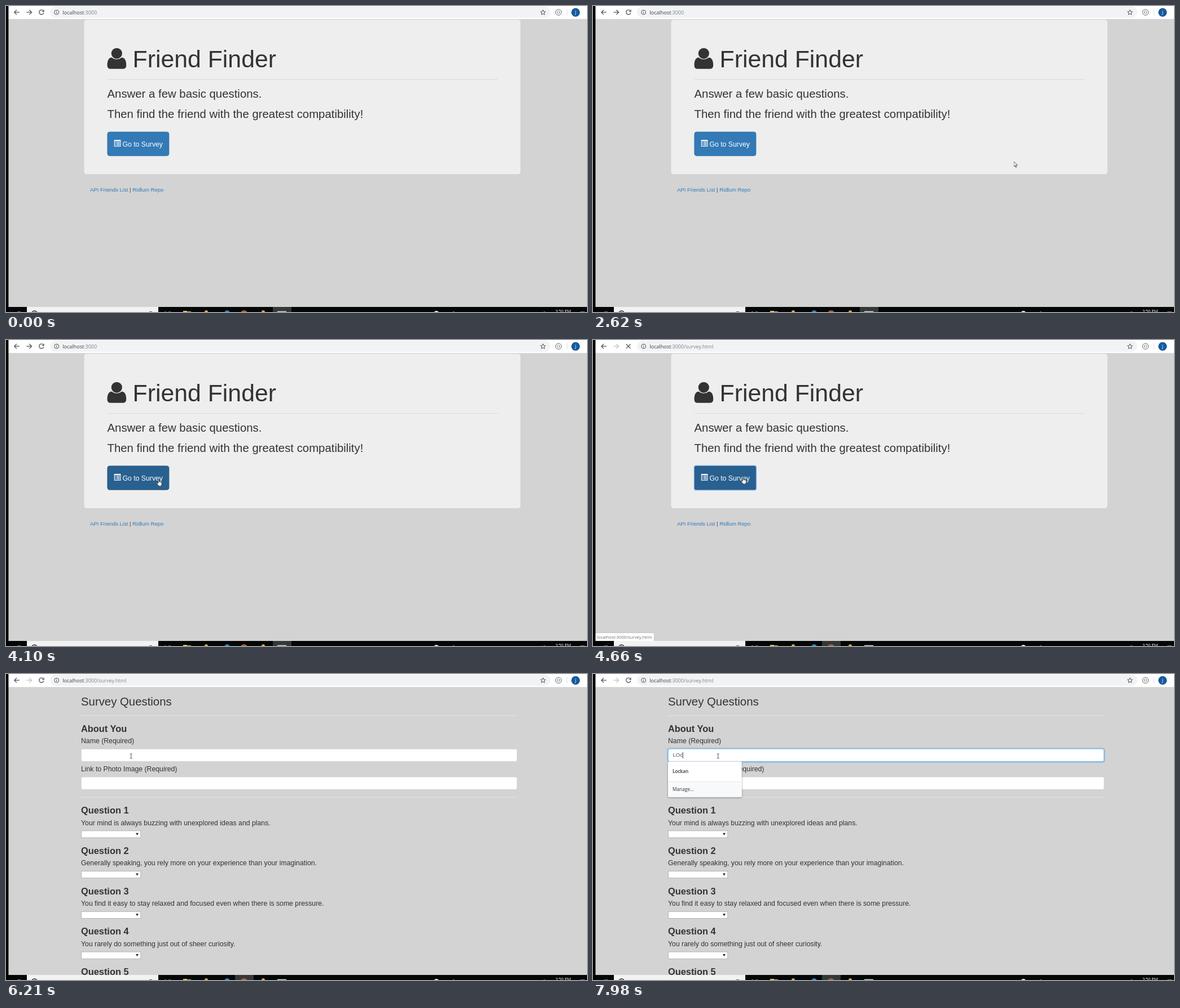
Animation, 1030 px wide and 544 px high, one loop 8 s. Source, as an HTML page:

```html
<!DOCTYPE html>
<html lang="en">
<head>
<meta charset="utf-8">
<title>Friend survey</title>
<style>
html, body { margin: 0; width: 100%; height: 100%; overflow: hidden; background: #000; }
svg { display: block; width: 1030px; height: 544px; }
text { font-family: "Liberation Sans", Arial, sans-serif; fill: #333; white-space: pre; }
.ui { font-family: "Open Sans", "Noto Sans", sans-serif; }
.h1 { font-size: 42.8px; }
.h3 { font-size: 20.38px; }
.h4 { font-size: 16.38px; font-weight: bold; }
.p { font-size: 12.28px; }
.small { font-size: 9.56px; }
.url { font-size: 9.04px; fill: #3c4043; }
.dim { fill: #80868b; }
.link { fill: #337ab7; }
.line { fill: none; stroke: #505357; stroke-width: 1.3; }
.rule { fill: #e6e6e6; }
.field { fill: #fff; stroke: #ccc; stroke-width: .7; }
.focus { stroke: #66afe9; stroke-width: 1.2; filter: drop-shadow(0 0 1.5px #66afe9); }
.list { filter: drop-shadow(0 1px 1.5px #0006); }
.name { font-size: 8.2px; font-weight: 600; }
.glyph { fill: #fff; stroke: #222; stroke-width: .8; stroke-linejoin: round; }

/* one loop = 8 s, 1% = 80 ms */
.t { animation: 8s step-end infinite; }
.home { animation-name: home; }
.survey { animation-name: survey; }
.url-a, .fwd { animation-name: before-load; }
.url-b, .fwd-off { animation-name: after-load; }
.reload { animation-name: reload; }
.stop { animation-name: stop; }
.btn { animation-name: btn; }
.ring { animation-name: ring; }
.status { animation-name: status; }
.active { animation-name: active; }
.input-on { animation-name: input-on; }
.all { animation-name: all; }
.two { animation-name: two; }
.one { animation-name: one; }
.k1 { animation-name: k1; }
.k2 { animation-name: k2; }
.k3 { animation-name: k3; }
.k4 { animation-name: k4; }
.caret { animation-name: caret; }
.arrow { animation-name: arrow; }
.hand { animation-name: hand; }
.beam { animation-name: beam; }
.pointer { animation-name: pointer; }

@keyframes home { 0% { opacity: 1 } 60.25%, 100% { opacity: 0 } }
@keyframes survey { 0% { opacity: 0 } 60.25%, 100% { opacity: 1 } }
@keyframes before-load { 0% { opacity: 1 } 57.25%, 100% { opacity: 0 } }
@keyframes after-load { 0% { opacity: 0 } 57.25%, 100% { opacity: 1 } }
@keyframes reload { 0% { opacity: 1 } 57.25% { opacity: 0 } 60.25%, 100% { opacity: 1 } }
@keyframes stop { 0% { opacity: 0 } 57.25% { opacity: 1 } 60.25%, 100% { opacity: 0 } }
@keyframes btn { 0% { fill: #337ab7; stroke: #2e6da4 } 50.25%, 100% { fill: #286090; stroke: #204d74 } }
@keyframes ring { 0% { opacity: 0 } 56.25%, 100% { opacity: 1 } }
@keyframes status {
  0% { opacity: 0 } 54.125% { opacity: .35 } 55.125% { opacity: .7 } 56.25% { opacity: 1 }
  62% { opacity: .65 } 63% { opacity: .3 } 63.875%, 100% { opacity: 0 }
}
@keyframes active { 0% { transform: translateX(67px) } 56.25%, 100% { transform: none } }
@keyframes input-on { 0% { opacity: 0 } 83.375%, 100% { opacity: 1 } }
@keyframes all {
  0% { opacity: 0 } 78.375% { opacity: .25 } 79.375% { opacity: .5 } 80.5% { opacity: .8 }
  81.625% { opacity: 1 } 90.125%, 100% { opacity: 0 }
}
@keyframes two { 0% { opacity: 0 } 90.125% { opacity: 1 } 91%, 100% { opacity: 0 } }
@keyframes one { 0% { opacity: 0 } 91% { opacity: 1 } 92.75% { opacity: 0 } 93.875%, 100% { opacity: 1 } }
@keyframes k1 { 0% { opacity: 0 } 89.125%, 100% { opacity: 1 } }
@keyframes k2 { 0% { opacity: 0 } 91%, 100% { opacity: 1 } }
@keyframes k3 { 0% { opacity: 0 } 92.75%, 100% { opacity: 1 } }
@keyframes k4 { 0% { opacity: 0 } 93.875% { opacity: 1 } 99.75%, 100% { opacity: 0 } }
@keyframes caret {
  0% { opacity: 0; transform: none } 78.375% { opacity: 1; transform: none }
  86.25% { opacity: 0; transform: none } 89.125% { opacity: 1; transform: translateX(5.3px) }
  91% { opacity: 1; transform: translateX(12.7px) } 92.75% { opacity: 1; transform: translateX(17.5px) }
  93.875% { opacity: 1; transform: translateX(22.3px) } 99.75%, 100% { opacity: 1; transform: translateX(17.5px) }
}
@keyframes arrow {
  0% { opacity: 0 } 4% { opacity: 1 } 13.375% { opacity: 0 } 21.25% { opacity: 1 }
  50.25% { opacity: 0 } 67.75% { opacity: 1 } 76.6%, 100% { opacity: 0 }
}
@keyframes hand { 0% { opacity: 0 } 50.25% { opacity: 1 } 67.75%, 100% { opacity: 0 } }
@keyframes beam { 0% { opacity: 0 } 76.6%, 100% { opacity: 1 } }
@keyframes pointer {
  0% { transform: translate(894px, 536px) }
  4% { transform: translate(894px, 536px); animation-timing-function: steps(3) }
  6.625% { transform: translate(838px, 488px); animation-timing-function: steps(3) }
  9.375% { transform: translate(807px, 467px) }
  21.25% { transform: translate(923px, 519px); animation-timing-function: steps(4) }
  25.125% { transform: translate(836px, 405px); animation-timing-function: steps(2) }
  27.125% { transform: translate(814px, 431px) }
  31% { transform: translate(798px, 372px); animation-timing-function: steps(2) }
  32.75% { transform: translate(745.5px, 276px); animation-timing-function: steps(5) }
  37.625% { transform: translate(663px, 316px) }
  40.625% { transform: translate(640px, 328px); animation-timing-function: steps(3) }
  43.625% { transform: translate(505px, 308px); animation-timing-function: steps(3) }
  46.5% { transform: translate(405px, 276px) }
  49.375% { transform: translate(342px, 262px) }
  50.25% { transform: translate(285px, 252px) }
  51.25% { transform: translate(267px, 247.5px) }
  52.25% { transform: translate(265px, 246px) }
  54.125% { transform: translate(262.3px, 243.8px) }
  67.75% { transform: translate(260px, 236px); animation-timing-function: steps(5) }
  72.7% { transform: translate(236px, 170px); animation-timing-function: steps(5) }
  77.625%, 100% { transform: translate(219.5px, 141.5px) }
}
</style>
</head>
<body>
<svg viewBox="0 0 1030 544">
  <rect width="1030" height="544" fill="#d3d3d3"/>

  <g class="t home">
    <rect x="138.5" y="24.5" width="773.5" height="274.5" rx="4.5" fill="#eee"/>
    <g fill="#333">
      <ellipse cx="196.3" cy="84.3" rx="9.6" ry="9.6"/>
      <path d="M187 91.5Q179.5 92.5 179.5 105.5Q179.5 111.8 185.5 111.8H207Q213.2 111.8 213.2 105.5Q213.2 92.5 205.5 91.5Q196.3 98.5 187 91.5Z"/>
    </g>
    <text class="h1" x="224.5" y="108.6">Friend Finder</text>
    <rect x="179.5" y="130" width="692.5" height="1" fill="#dcdcdc"/>
    <text class="h3" x="179.5" y="163">Answer a few basic questions.</text>
    <text class="h3" x="179.5" y="198.7">Then find the friend with the greatest compatibility!</text>
    <rect class="t btn" x="179.9" y="223.9" width="109" height="42.4" rx="3.8" stroke-width=".8"/>
    <rect class="t ring" x="179.4" y="223.4" width="110" height="43.4" rx="3" fill="none" stroke="#72a9e6" stroke-width="1.3"/>
    <path d="M191.8 238H203.4V250H191.8ZM192.9 240.3V248.9H202.3V240.3Z" fill="#fff" fill-rule="evenodd"/>
    <path d="M193.8 241.8h1.2m1 0h5.5M193.8 243.7h1.2m1 0h5.5M193.8 245.6h1.2m1 0h5.5M193.8 247.5h1.2m1 0h5.5" stroke="#fff"/>
    <text class="p" x="206.4" y="249.6" style="fill:#fff">Go to Survey</text>
    <text class="small" x="149" y="329.6"><tspan class="link">API Friends List</tspan> | <tspan class="link">Ridlum Repo</tspan></text>
  </g>

  <g class="t survey">
    <text class="h3" x="133" y="56">Survey Questions</text>
    <rect class="rule" x="133" y="73.5" width="773.5" height="1"/>
    <text class="h4" x="133" y="102.6">About You</text>
    <text class="p" x="133" y="123">Name (Required)</text>
    <rect class="field" x="133.3" y="133.3" width="772.7" height="22.2" rx="2.5"/>
    <text class="p" x="133" y="172.6">Link to Photo Image (Required)</text>
    <rect class="field" x="133.3" y="183" width="772.7" height="22.2" rx="2.5"/>
    <rect class="rule" x="133" y="218.6" width="773.5" height="1"/>
    <g id="questions"></g>
    <rect class="t field focus input-on" x="133" y="133" width="773" height="22.8" rx="2.5"/>
    <g id="typed"></g>
    <rect class="t caret" x="141.3" y="139" width="1" height="11" fill="#333"/>
    <g id="lists"></g>
  </g>

  <g class="t status">
    <path d="M3.5 520.5H105.5Q108.5 520.5 108.5 523.5V536H3.5Z" fill="#fff" stroke="#bbb" stroke-width=".8"/>
    <text class="ui" x="7" y="530.7" style="font-size:7.75px;fill:#6b6f73">localhost:3000/survey.html</text>
  </g>

  <!-- browser bar -->
  <rect x="4" width="1026" height="23.5" fill="#fff"/>
  <rect x="4" y="23" width="1026" height="1" fill="#d9dadc"/>
  <rect x="78" y="1" width="887" height="20" rx="10" fill="#f1f3f4"/>
  <g class="line">
    <path d="M23.8 11.2H15M19 7L14.8 11.2L19 15.4"/>
    <path class="t fwd" d="M36.5 11.2H45.3M41.3 7L45.5 11.2L41.3 15.4"/>
    <path class="t fwd-off" d="M36.5 11.2H45.3M41.3 7L45.5 11.2L41.3 15.4" stroke="#c0c2c4"/>
    <path class="t reload" d="M66 8.4A4.1 4.1 0 1 0 66.8 12.3M67 6.7V9.8H63.8"/>
    <path class="t stop" d="M58.8 7.3L66.6 15.1M66.6 7.3L58.8 15.1"/>
    <circle cx="89.7" cy="11.2" r="4" stroke-width="1"/>
    <path d="M89.7 10.5V13.5M89.7 8.6V9.6" stroke-width="1"/>
    <path d="M952 6.8L953.3 9.9L956.5 10.1L954 12.2L954.8 15.4L952 13.7L949.2 15.4L950 12.2L947.5 10.1L950.7 9.9Z" stroke-width="1"/>
    <circle cx="979.5" cy="11.2" r="5.2" stroke-width=".9"/>
    <path d="M978.8 8.8Q977.6 8.8 977.8 10.2T977 11.2Q978 11.2 977.8 12.3T978.8 13.7M980.2 8.8Q981.4 8.8 981.2 10.2T982 11.2Q981 11.2 981.2 12.3T980.2 13.7" stroke-width=".8"/>
  </g>
  <rect x="994" y="5.5" width="1" height="11" fill="#dfe1e4"/>
  <circle cx="1009.8" cy="11.3" r="7.6" fill="#155a9c"/>
  <text class="ui" x="1009.8" y="14" text-anchor="middle" style="font-size:9px;fill:#fff">j</text>
  <text class="ui url t url-a" x="100.3" y="14.6">localhost<tspan class="dim">:3000</tspan></text>
  <text class="ui url t url-b" x="100.3" y="14.6">localhost<tspan class="dim">:3000/survey.html</tspan></text>

  <!-- task bar -->
  <rect y="535" width="1030" height="9" fill="#040706"/>
  <rect width="4.4" height="544"/>
  <rect x="37" y="535" width="233" height="9" fill="#f2f2f2"/>
  <rect class="t active" x="406" y="535" width="33" height="9" fill="#343837"/>
  <circle cx="50.5" cy="547.5" r="5.5" fill="none" stroke="#222" stroke-width="1.3"/>
  <rect x="254" y="543" width="5" height="1" fill="#555"/>
  <g fill="#777">
    <rect x="20" y="543" width="6" height="1"/>
    <rect x="281" y="543" width="3" height="1"/>
    <rect x="288" y="543" width="4" height="1"/>
    <rect x="792" y="543" width="3" height="1"/>
    <rect x="953" y="543" width="3" height="1"/>
    <rect x="1018" y="543" width="8" height="1"/>
  </g>
  <rect x="314" y="542" width="7" height="2" fill="#e9c46a"/>
  <rect x="321" y="543" width="7" height="1" fill="#e9c46a"/>
  <circle cx="355" cy="544" r="3" fill="#d9a55c"/>
  <circle cx="392" cy="546" r="5" fill="#2e86c8"/>
  <circle cx="422" cy="548" r="7" fill="#a8623c"/>
  <circle cx="456" cy="544" r="3" fill="#d9a55c"/>
  <rect x="481" y="542.6" width="16" height="1.4" fill="#d5e5dc"/>
  <circle cx="763" cy="547" r="5" fill="#eee"/>
  <text class="ui" x="974" y="545.2" style="font-size:7.3px;fill:#fff">3:50 PM</text>

  <g class="t pointer">
    <path class="t glyph arrow" d="M.4 .5V9.4L2.5 7.5L4 10.8L5.3 10.2L3.9 7H6.6Z"/>
    <path class="t glyph hand" d="M2.9 7.4V1.4Q2.9 .4 3.7 .4T4.5 1.4V4.6Q5.3 4 6 4.9Q6.9 4.4 7.5 5.3Q9.2 5 9.2 6.6V8.9L8.2 12.2H4L.6 8Q.1 6.5 1.2 6.3Z"/>
    <path class="t beam" d="M.3 .5H1.7L2.2 1L2.7 .5H4.1M2.2 1V8M.3 8.5H1.7L2.2 8L2.7 8.5H4.1" fill="none" stroke="#333" stroke-width=".9"/>
  </g>
</svg>
<script>
const questions = [
  "Your mind is always buzzing with unexplored ideas and plans.",
  "Generally speaking, you rely more on your experience than your imagination.",
  "You find it easy to stay relaxed and focused even when there is some pressure.",
  "You rarely do something just out of sheer curiosity.",
  ""
];

function question(text, i) {
  return `<g transform="translate(133 ${248 + i * 71.75})">
    <text class="h4">Question ${i + 1}</text>
    <text class="p" y="20.6">${text}</text>
    <rect x=".4" y="30.8" width="105.4" height="12.2" fill="#fff" stroke="#a9a9a9" stroke-width=".8"/>
    <path d="M97 34.8h5l-2.5 4z" fill="#222"/>
  </g>`;
}

function list(cls, names) {
  const step = 24.45, foot = 191 + step * (names.length - 1);
  const rows = names.map((n, i) =>
    `<text class="ui name" x="141" y="${175.8 + i * step}">${n}</text>`).join("");
  return `<g class="t ${cls}"><g class="list">
    <rect x="133" y="155.5" width="130.7" height="${foot - 127.7}" rx="2" fill="#fff"/>
    <path d="M133 ${foot}h130.7v25.8q0 2-2 2h-126.7q-2 0-2-2z" fill="#f8f9fa"/>
    <rect x="133" y="${foot}" width="130.7" height=".8" fill="#e6e8ea"/>
    ${rows}
    <text class="ui" x="141" y="${foot + 17}" style="font-size:8.3px">Manage...</text>
  </g></g>`;
}

// each typed letter is its own text so it can appear alone
const offsets = [0, 5.3, 12.7, 17.5];
const letter = (c, i) =>
  `<text class="small t k${i + 1}" x="${141.5 + offsets[i]}" y="147" style="fill:#555">${c}</text>`;

const fill = (sel, html) => document.querySelector(sel).innerHTML = html;
fill("#questions", questions.map(question).join(""));
fill("#typed", [..."LOck"].map(letter).join(""));
fill("#lists",
  list("all", ["r", "Lockan", "Ferdinal", "Kirsta", "Mirra", "LK"]) +
  list("two", ["Lockan", "LK"]) +
  list("one", ["Lockan"]));
</script>
</body>
</html>
```
